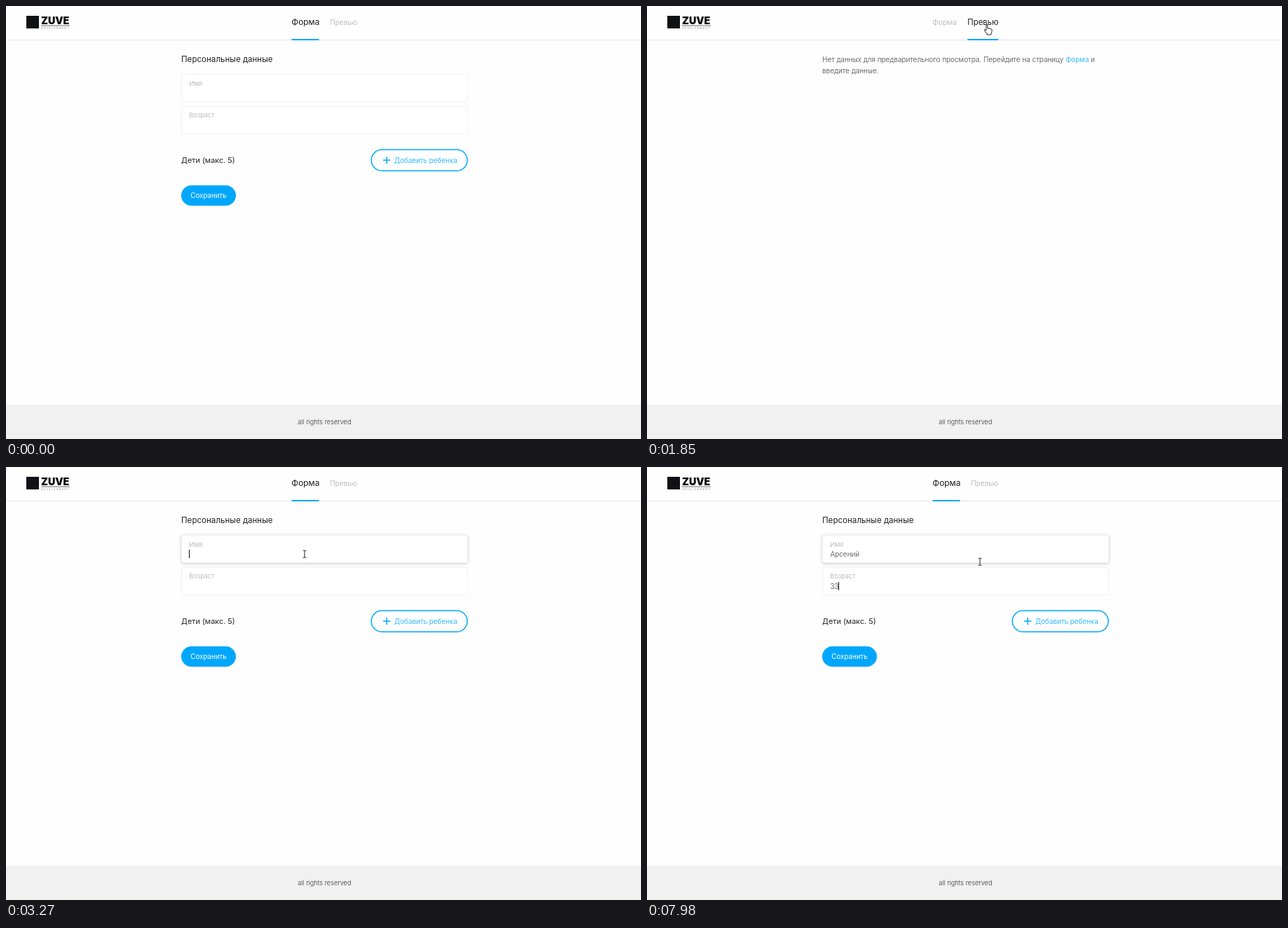
Write an HTML page that moves like this. It is 906x618 px and loops after 8 s.

```html
<!DOCTYPE html>
<html lang="ru">
<head>
<meta charset="utf-8">
<title>Форма</title>
<style>
  html, body { margin: 0; width: 100%; height: 100%; overflow: hidden; background: #fefefe; }
  svg { display: block; width: 100%; height: 100%; }
  text { font: 300 10px Inter, "Open Sans", sans-serif; fill: #444; white-space: pre; }
  .head { font-size: 11.6px; font-weight: 400; fill: #222; }
  .label { font-size: 9.2px; fill: #a8a8a8; }
  .blue { fill: #01a7fd; }
  .field { fill: #fff; stroke: #f1f1f1; }
  .hover { filter: drop-shadow(0 1.5px 2px rgba(0, 0, 0, .22)); }
</style>
</head>
<body>
<svg viewBox="0 0 906 618">
  <rect width="906" height="618" fill="#fefefe"/>
  <rect y="48" width="906" height="1" fill="#e6e6e6"/>
  <rect y="569" width="906" height="49" fill="#f1f1f1"/>
  <text x="454.4" y="597.3" text-anchor="middle" style="font-size:9.2px;fill:#333">all rights reserved</text>

  <rect x="29" y="14" width="18" height="18" fill="#101216"/>
  <text x="50" y="26" style="font-size:14.3px;font-weight:900;fill:#0a0a0a">ZUVE</text>
  <rect x="50" y="27.6" width="41" height=".9" fill="#555"/>
  <text x="50.3" y="33.4" style="font-size:3.7px;letter-spacing:1.2px;fill:#666">DEVELOPMENT</text>

  <rect id="line1" class="blue" x="407.5" y="47" height="2"/>
  <rect id="hoverLine" y="47" height="2" fill="#858585"/>
  <rect id="line2" class="blue" y="47" height="2"/>
  <text id="tab1" x="407.3" y="26.8">Форма</text>
  <text id="tab2" y="26.8">Превью</text>

  <g id="form">
    <text class="head" x="250" y="79.8">Персональные данные</text>
    <rect id="ageBox" class="field" x="250.5" y="143.5" width="408" height="39" rx="2.5"/>
    <rect id="nameBox" class="field" x="250.5" y="97.5" width="408" height="39" rx="2.5"/>
    <text class="label" x="261.3" y="113.6">Имя</text>
    <text class="label" x="261.3" y="159.3">Возраст</text>
    <text id="name" x="261.5" y="127.6"></text>
    <text id="age" x="261.5" y="173.5"></text>
    <rect id="caret" width="1" height="12" fill="#111"/>
    <text class="head" x="250" y="223.7" style="font-size:10.85px">Дети (макс. 5)</text>
    <rect x="521.2" y="205" width="137" height="30.2" rx="15.1" fill="#fff" stroke="#01a7fd" stroke-width="1.5"/>
    <path d="M538 220.1h10.4M543.2 214.9v10.4" stroke="#01a7fd" stroke-width="1.5"/>
    <text class="blue" x="554" y="223.6">Добавить ребенка</text>
    <rect class="blue" x="250" y="256" width="78" height="29" rx="14.5"/>
    <text x="289" y="274" text-anchor="middle" style="font-size:9.8px;font-weight:400;fill:#fff">Сохранить</text>
  </g>

  <g id="preview">
    <text x="250" y="79.7">Нет данных для предварительного просмотра. Перейдите на страницу <tspan class="blue">Форма</tspan> и</text>
    <text x="250" y="95.7">введите данные.</text>
  </g>

  <g id="pointer">
    <circle id="press" r="8.3" fill="#f8ee2e" opacity=".82"/>
    <path id="arrow" d="M0 0V10L2.3 8 3.9 11.8 5.6 11 4 7.5H7Z" fill="#000" stroke="#fff" stroke-width=".6"/>
    <path id="hand" d="M-1 1.2Q0-.6 1 1.2V6q1-.9 2 .2 1-.7 2 .4 1.5-.5 2 .8V10.500q0 1.500-1 2.700V15H0V13.500L-3.500 9q-.6-1.600.6-1.600L-1 9Z" fill="#fff" stroke="#111" stroke-width=".9" stroke-linejoin="round"/>
    <path id="beam" d="M-2.300-5Q0-5 0-4 0-5 2.300-5M0-4.500V5M-2.300 5.500Q0 5.500 0 4.500 0 5.500 2.300 5.500" fill="none" stroke="#222"/>
  </g>
</svg>
<script>
const LOOP = 8000;
const $ = id => document.getElementById(id);
const set = (id, attrs) => { for (const k in attrs) $(id).setAttribute(k, attrs[k]); };
const show = (id, on) => $(id).setAttribute('visibility', on ? 'inherit' : 'hidden');
const ramp = (t, from, to) => Math.min(1, Math.max(0, (t - from) / (to - from)));
const easeOut = u => 1 - (1 - u) ** 2;
const smooth = u => u * u * (3 - 2 * u);
const mix = (a, b, u) => a + (b - a) * u;

// Pointer path: time, x, y
const path = [
  [690, 866, 86], [1125, 485, 26], [1880, 485, 26], [2360, 617, 76],
  [2690, 617, 76], [2720, 618.5, 79.5], [3150, 426, 124],
  [7935, 426, 124], [7980, 475, 135]
];
const presses = [[1600, 1670], [2630, 2690], [3170, 3255]];
const toPreview = 1670, toForm = 2660, focusName = 3240, focusAge = 6990;
const typed = {
  name: ['Арсений', [4700, 4960, 5160, 5390, 5590, 5760, 5860]],
  age: ['33', [7720, 7920]]
};
const caretEvents = [focusName, ...typed.name[1], focusAge, ...typed.age[1]];

function pointerAt(t) {
  const i = path.findIndex(p => p[0] > t);
  if (i < 1) return (i ? path[path.length - 1] : path[0]).slice(1);
  const [a, b] = [path[i - 1], path[i]];
  const u = smooth(ramp(t, a[0], b[0]));
  return [mix(a[1], b[1], u), mix(a[2], b[2], u)];
}

function drawTab(id, size, active) {
  const grey = Math.round(mix(172, 30, active));
  $(id).style.cssText =
    `font-size:${size}px;font-weight:${active > .7 ? 400 : 300};fill:rgb(${grey},${grey},${grey})`;
}

function drawTabs(t) {
  const p = easeOut(ramp(t, toPreview, toPreview + 180)) - easeOut(ramp(t, toForm, toForm + 200));
  const width = mix(39, 44, p), x = 501.3 - width;
  const hover = t < 1900 ? ramp(t, 1040, 1140) : 0;
  drawTab('tab1', mix(11.9, 10.4, p), 1 - p);
  drawTab('tab2', mix(10.1, 11.35, p), p);
  set('tab2', { x });
  set('line1', { width: mix(39, 34, p), opacity: 1 - p });
  set('line2', { x, width, opacity: p });
  set('hoverLine', { x, width, opacity: hover * (1 - p) });
}

function drawTyping(t) {
  for (const id in typed) {
    const [word, times] = typed[id];
    $(id).textContent = word.slice(0, times.filter(at => at <= t).length);
  }
  const last = caretEvents.filter(at => at <= t).pop();
  const inAge = t >= focusAge;
  const length = $(inAge ? 'age' : 'name').getComputedTextLength();
  set('caret', { x: Math.floor(261 + length), y: inAge ? 164 : 118 });
  show('caret', last !== undefined && Math.floor((t - last) / 530) % 2 === 0);
}

function drawPointer(t, isPreview) {
  const [x, y] = pointerAt(t);
  const within = (l, top, r, b) => x >= l && x <= r && y >= top && y <= b;
  const visible = t >= path[0][0];
  const overName = !isPreview && within(250, 97, 659, 137);
  const overTab = within(457, 0, 502, 49);
  const overLink = isPreview && within(598, 69, 633, 86);
  const kind = overName ? 'beam' : overTab || overLink ? 'hand' : 'arrow';
  set('pointer', { transform: `translate(${x} ${y})` });
  show('pointer', visible);
  for (const id of ['arrow', 'hand', 'beam']) show(id, id === kind);
  show('press', presses.some(([from, to]) => t >= from && t < to));
  $('nameBox').classList.toggle('hover', visible && overName);
}

const start = performance.now();
function frame() {
  const t = (performance.now() - start) % LOOP;
  const isPreview = t >= toPreview && t < toForm;
  $('form').style.display = isPreview ? 'none' : '';
  $('preview').style.display = isPreview ? '' : 'none';
  drawTabs(t);
  drawTyping(t);
  drawPointer(t, isPreview);
  requestAnimationFrame(frame);
}
frame();
</script>
</body>
</html>
```
